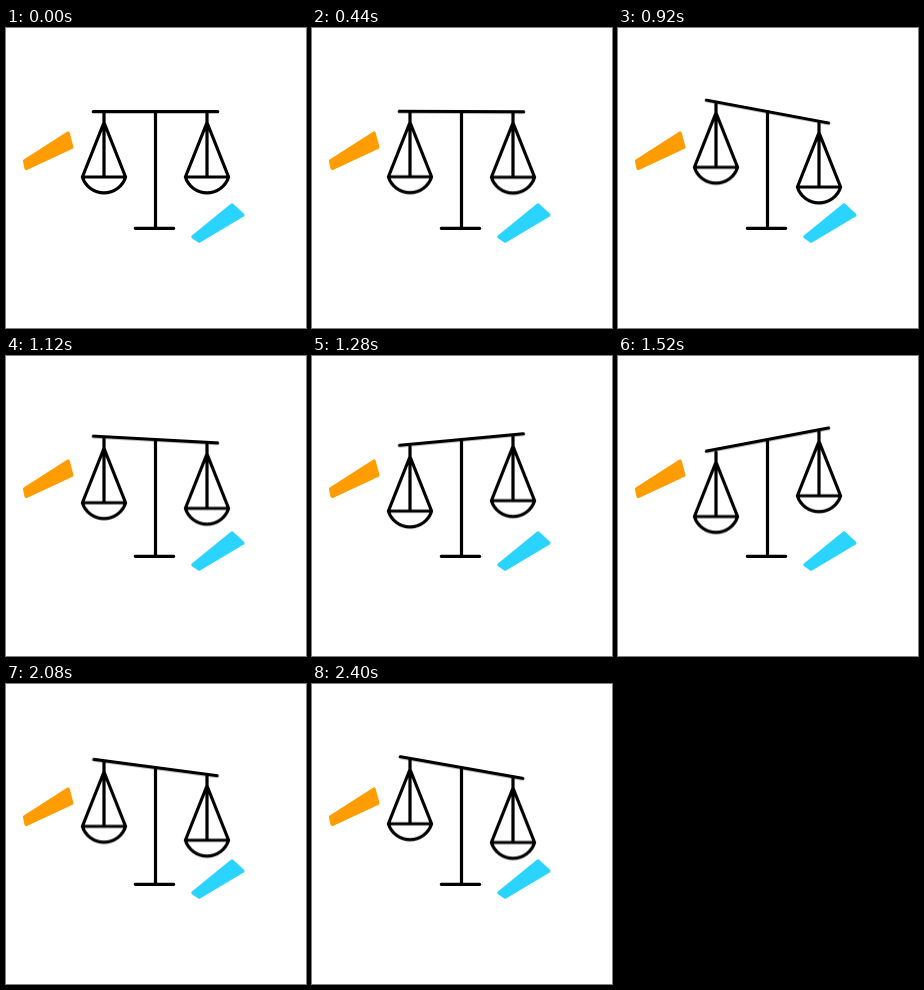
Recreate the animation shown at these times as an HTML page without scripts. Size 300x300 px, loop 2440 ms.

```html
<!DOCTYPE html>
<html lang="en">
<head>
<meta charset="utf-8">
<title>Balance scales</title>
<style>
  html, body { margin: 0; width: 100%; height: 100%; overflow: hidden; background: #fff; }
  svg { display: block; width: 100%; height: 100%; }

  .ink { fill: none; stroke: #000; stroke-width: 3.2; stroke-linecap: round; stroke-linejoin: round; }
  .shard { stroke-width: 3.5; stroke-linejoin: round; }
  .orange { fill: #ff9d00; stroke: #ff9d00; }
  .blue { fill: #2ad4ff; stroke: #2ad4ff; }

  .beam, .pan { animation: 2440ms cubic-bezier(.333, 0, .667, 1) infinite; }
  .beam { animation-name: tilt; transform-origin: 149.5px 83.7px; }
  .pan { animation-name: bob; }
  .left { --first: -10px; --second: 11.7px; }
  .right { --first: 10.3px; --second: -9.4px; }

  /* rest, right side down, left side down, right side down, then cut back to rest */
  @keyframes tilt {
    0%, 16.393% { transform: rotate(0deg); }
    36.066% { transform: rotate(10.9deg); }
    60.656% { transform: rotate(-10.9deg); }
    93.443% { transform: rotate(10.9deg); animation-timing-function: cubic-bezier(.333, 0, .667, .333); }
    100% { transform: rotate(9.4deg); }
  }
  @keyframes bob {
    0%, 16.393% { transform: translateY(0); }
    36.066% { transform: translateY(var(--first)); }
    60.656% { transform: translateY(var(--second)); }
    93.443% { transform: translateY(var(--first)); animation-timing-function: cubic-bezier(.333, 0, .667, .333); }
    100% { transform: translateY(calc(var(--first) * .862)); }
  }
</style>
</head>
<body>
<svg viewBox="0 0 300 300">
  <defs>
    <path id="pan" d="M0 84.5V149M0 94.5L-21.6 149H21.6ZM-21.6 149A22.6 22.6 0 0 0 21.6 149"/>
  </defs>
  <path class="shard orange" d="M18.7 133L62 105.2L65.8 119.2L20.2 140.3Z"/>
  <path class="shard blue" d="M187 208.8L226 177L236.8 187L193.2 213Z"/>
  <g class="ink">
    <path d="M149.5 83.7V200.3M129.3 200.3H167.7"/>
    <path class="beam" d="M87.3 83.7H211.7"/>
    <g class="pan left"><use href="#pan" x="98"/></g>
    <g class="pan right"><use href="#pan" x="201"/></g>
  </g>
</svg>
</body>
</html>
```
